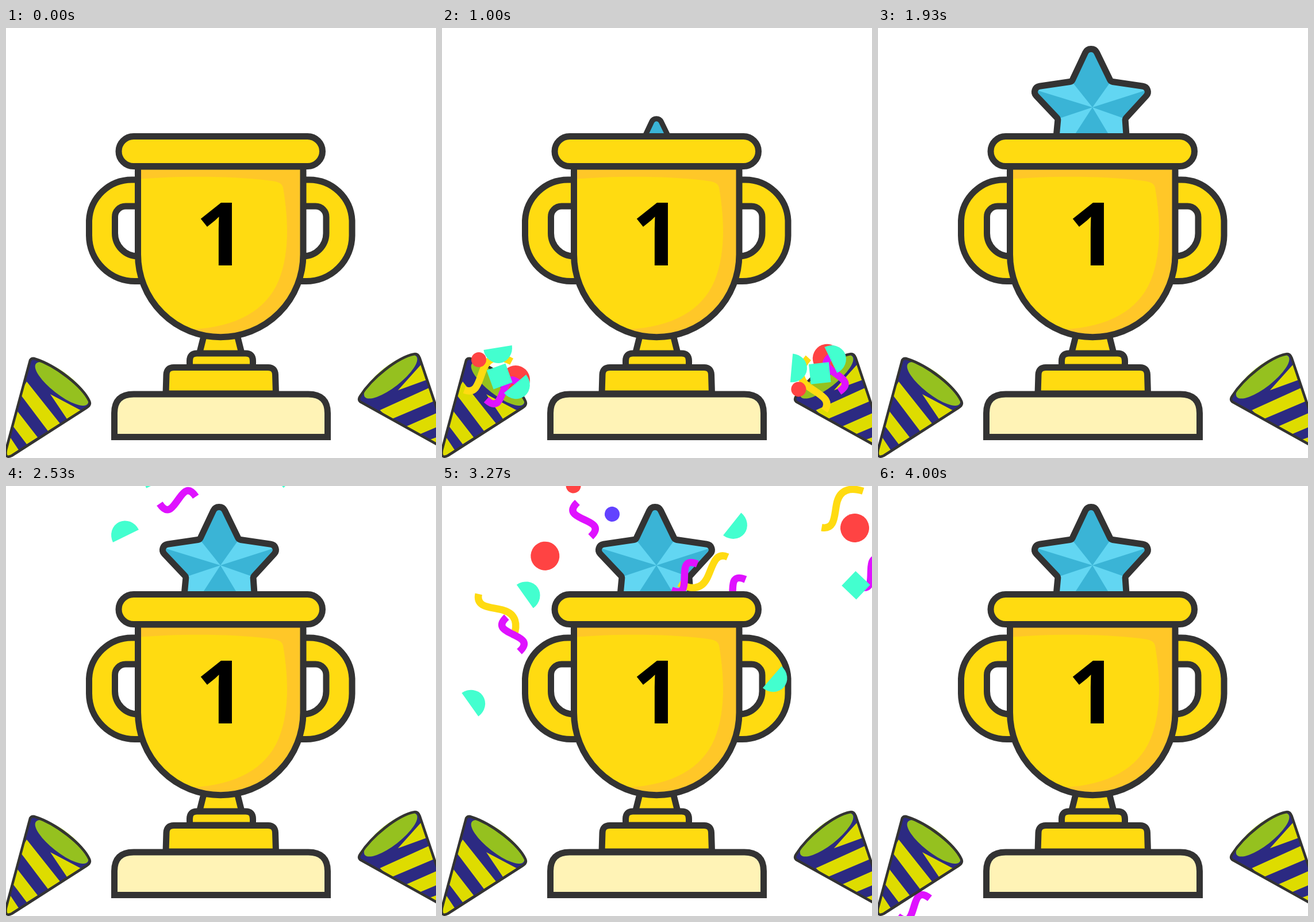
Recreate the animation shown at these times as an HTML page with a canvas. Size 748 px wide and 748 px high, loop 4070 ms.

```html
<!DOCTYPE html>
<html lang="en">
<head>
<meta charset="utf-8">
<title>First place trophy</title>
<style>
html, body { margin: 0; width: 100%; height: 100%; overflow: hidden; background: #fff; }
canvas { display: block; width: 100vw; height: 100vh; }
</style>
</head>
<body>
<canvas id="stage" width="748" height="748"></canvas>
<script>
const ctx = document.getElementById('stage').getContext('2d');
const LOOP = 4070, FPS = 15, RAD = Math.PI / 180;
const INK = '#333333', GOLD = '#ffdb11', SHADE = '#ffc728', CREAM = '#fff3b6';
const CYAN = '#43ffcf', RED = '#ff4343', PINK = '#df12ff', BLUE = '#6242ff';

const clamp = (v) => Math.min(1, Math.max(0, v));
const mix = (a, b, p) => a + (b - a) * p;
const smooth = (p) => p * p * (3 - 2 * p);

function at(x, y, deg, draw, scale = 1) {
  ctx.save();
  ctx.translate(x, y);
  ctx.rotate(deg * RAD);
  ctx.scale(scale, scale);
  draw();
  ctx.restore();
}

function paint(path, fill, stroke, width = 11) {
  if (fill) { ctx.fillStyle = fill; ctx.fill(path, 'evenodd'); }
  if (stroke) { ctx.strokeStyle = stroke; ctx.lineWidth = width; ctx.stroke(path); }
}

function poly(points) {
  return new Path2D('M' + points.map((p) => p.join(' ')).join('L') + 'Z');
}

// Polygon with rounded corners: each vertex is [x, y, radius].
function roundPoly(v) {
  const path = new Path2D(), n = v.length, last = v[n - 1];
  path.moveTo((last[0] + v[0][0]) / 2, (last[1] + v[0][1]) / 2);
  v.forEach((p, i) => {
    const q = v[(i + 1) % n];
    path.arcTo(p[0], p[1], q[0], q[1], p[2]);
  });
  path.closePath();
  return path;
}

// ---- Trophy ----
const cup = new Path2D('M229.5 241V394A143.7 143.7 0 0 0 517 394V241Z');
const cupShade = new Path2D('M229 240H517V540H373L325 524C400 520 452 492 474 440C494 392 491 330 482 278C480 268 470 267 455 265C390 257 300 257 229 263Z');
const rim = new Path2D();
rim.roundRect(196, 188.5, 354.5, 52, 26);
const handleOut = 'M232 264H219A74.5 74.5 0 0 0 144.5 335V361A80 80 0 0 0 225 440.5H236';
const handleIn = 'M232 310H208A18.5 18.5 0 0 0 189.5 329V357A40 40 0 0 0 229 397H232';
const handleFill = new Path2D(handleOut + 'Z ' + handleIn + 'Z');
const handleLine = new Path2D(handleOut + handleIn);
const stem = poly([[345, 532], [336, 568], [410.5, 568], [401.5, 532]]);
const stepTop = new Path2D('M319.5 590V579Q319.5 566 332 566H417Q429.5 566 429.5 579V590Z');
const stepMid = new Path2D('M278 636L279 603Q279.500 590.500 292 590.500H456Q468 590.500 468.500 603L469.500 636Z');
const base = new Path2D('M188.5 711.5V670Q188.500 637 222 637H526Q559.500 637 559.500 670V711.5Z');

function drawHandle() {
  paint(handleFill, GOLD);
  paint(handleLine, null, INK);
}

function drawTrophy() {
  ctx.lineJoin = 'miter';
  drawHandle();
  ctx.save();
  ctx.translate(746.5, 0);
  ctx.scale(-1, 1);
  drawHandle();
  ctx.restore();

  paint(stem, GOLD, INK);
  paint(stepTop, GOLD, INK);
  paint(stepMid, GOLD, INK);
  paint(base, CREAM, INK);

  paint(cup, GOLD);
  ctx.save();
  ctx.clip(cup);
  paint(cupShade, SHADE);
  ctx.restore();
  paint(cup, null, INK);
  paint(rim, GOLD, INK);

  ctx.fillStyle = '#000';
  ctx.font = '700 153px "Open Sans", sans-serif';
  ctx.textAlign = 'center';
  ctx.fillText('1', 373.5, 413);
}

// ---- Star ----
const tips = {
  top: [-2.5, -116, 11], ur: [32, -45, 6], right: [106.5, -34, 10], lr: [57, 20, 6],
  footR: [63, 105, 10], low: [-2.5, 70, 6], footL: [-68, 105, 10],
  ll: [-60, 20, 6], left: [-111, -34, 10], ul: [-36, -45, 6]
};
const starPath = roundPoly(Object.values(tips));
const facets = [['left', 'ul'], ['ur', 'right'], ['ll', 'footL'], ['lr', 'footR']]
  .map(([a, b]) => poly([[0, 0], tips[a].slice(0, 2), tips[b].slice(0, 2)]));

function drawStar(t) {
  if (t < 0.9) return;
  const r = Math.pow(Math.max(0, 1.733 - t) / 0.733, 1.83);
  at(373 + 2 * r, 138 + 104 * r, 0, () => {
    ctx.lineJoin = 'round';
    paint(starPath, '#3ab4d6');
    ctx.save();
    ctx.clip(starPath);
    facets.forEach((f) => paint(f, '#62d6f2'));
    ctx.restore();
    paint(starPath, null, INK);
  }, 1 - 0.17 * r);
}

// ---- Poppers, drawn around the middle of the mouth ----
const sides = [{ x: 94, y: 615, rot: 0 }, { x: 664.5, y: 608.5, rot: -76 }];
const cone = new Path2D('M-52 -37Q-49 -42 -42 -39C-8 -28 39 8 51 34Q54 40 47 45L-84 129Q-97 135 -94 119Z');
const mouth = new Path2D();
mouth.ellipse(3, 4, 57, 18.5, 38 * RAD, 0, Math.PI * 2);
const stripes = [
  [[-17, 22], [36, 50], [12, 65]],
  [[-58, 0], [0, 73], [-21, 86], [-70, 21]],
  [[-77, 48], [-39, 97], [-58, 109], [-86, 72]],
  [[-90, 92], [-72, 119], [-92, 132], [-98, 112]]
].map(poly);

function drawPoppers(t) {
  const pull = t < 0.733
    ? smooth(clamp((t - 0.2) / 0.533))
    : 1 - clamp((t - 0.733) / 0.2);
  sides.forEach((s) => at(s.x, s.y, s.rot, () => {
    ctx.translate(-13 * pull, 18 * pull);
    ctx.lineJoin = 'round';
    paint(cone, '#2c2a82');
    ctx.save();
    ctx.clip(cone);
    stripes.forEach((p) => paint(p, '#dedc00'));
    ctx.restore();
    paint(mouth, '#95c11f');
    paint(cone, null, INK, 4.5);
  }));
}

// ---- Confetti ----
const disc = (r) => {
  const p = new Path2D();
  p.arc(0, 0, r, 0, Math.PI * 2);
  return p;
};
const half = new Path2D('M-25 0A25 27 0 0 1 25 0Z');
const square = new Path2D('M-17.5 -17.500H17.500V17.500H-17.500Z');
const wave = new Path2D('M-48 0C-32 20 -16 -4 2 -16S36 -20 48 0');
const curl = new Path2D('M-32 0C-22 24 -10 9 0 0S22 -24 32 0');
const shapes = {
  half: () => paint(half, CYAN),
  square: () => paint(square, CYAN),
  big: () => paint(disc(25), RED),
  small: () => paint(disc(13), RED),
  blue: () => paint(disc(13), BLUE),
  wave: () => paint(wave, null, GOLD, 12.5),
  curl: () => paint(curl, null, PINK, 12.5)
};

// shape, local x, y, rotation, then x, y, rotation at the top for the left and right popper
const burst = [
  ['blue', 16, 0, 0, 60, -90, 0, 677, 27, 0],
  ['big', 34, -3, 0, 330, -120, 0, 454, -7, 0],
  ['curl', 12, 18, -25, 296, -5, 110, 672, -28, 98],
  ['half', 33, 4, 140, 260, -150, 200, 607, -4, 195],
  ['wave', -14, -10, -31, 222, -14, 115, 560, -140, 40],
  ['square', 6, -9, -20, 140, -180, 60, 590, 24, 15],
  ['half', 3, -59, 171, 178, -7, 200, 500, -120, 150],
  ['small', -30, -38, 0, 90, -120, 0, 690, -120, 0]
];

function drawBurst(t) {
  if (t < 0.92 || t > 1.75) return;
  const u = Math.max(0, (t - 1) / 0.3333);
  burst.forEach(([name, x, y, rot, ...ends], i) => {
    const p = Math.pow(u, 1.5 + (i % 3) * 0.5);
    sides.forEach((s, j) => {
      const c = Math.cos(s.rot * RAD), n = Math.sin(s.rot * RAD);
      const [ex, ey, er] = ends.slice(j * 3);
      at(mix(s.x + x * c - y * n, ex, p), mix(s.y + x * n + y * c, ey, p),
        mix(rot + s.rot, er, p), shapes[name]);
    });
  });
}

// shape, early x, y, late x, y, late rotation, final drop
const T1 = 2.9333, T2 = 3.5333;
const rainFront = [
  ['big', 228, 0, 153, 243, 0],
  ['big', 657, -7, 751, 161, 0],
  ['wave', 98, 85, 92, 361, 80],
  ['wave', 640, -90, 727, 169, -12],
  ['half', 190, 81.5, 119.5, 304.5, 84],
  ['half', 108.5, 227, 16.5, 527, 84],
  ['half', 534, 154, 596, 499, 160],
  ['half', 470, -70, 523.5, 199, 158],
  ['curl', 189, 132, 88, 383, 99, 80],
  ['curl', 275, -70, 232, 185, 98],
  ['curl', 646, 33, 800, 270, 164],
  ['square', 751.5, 46, 703, 298, -17],
  ['square', 270, -110, 242.5, 54, -5],
  ['small', 250, -90, 217, 95, 0],
  ['blue', 320, -80, 283, 176, 0]
];
const rainBack = [
  ['wave', 482, -16, 440, 300, 181],
  ['curl', 462, -26, 400, 330, 164],
  ['curl', 571, 22, 470, 340, 164]
];

function drawRain(list, t) {
  if (t < 2.15) return;
  const p = (t - T1) / (T2 - T1);
  const bend = (t - T1) * (t - T2);
  const exit = clamp((t - 3.7333) / 0.2667) ** 2;
  list.forEach(([name, x1, y1, x2, y2, rot, drop = 800]) => {
    const x = mix(x1, x2, p) - (x2 - x1) * 1.05 * bend;
    const y = mix(y1, y2, p) + 150 * bend + drop * exit;
    at(x, y, rot + 110 * (t - T2), shapes[name]);
  });
}

function render(t) {
  ctx.fillStyle = '#fff';
  ctx.fillRect(0, 0, 748, 748);
  drawStar(t);
  drawRain(rainBack, t);
  drawTrophy();
  drawRain(rainFront, t);
  drawPoppers(t);
  drawBurst(t);
}

const start = performance.now();
function tick() {
  const ms = (performance.now() - start) % LOOP;
  render(Math.floor((ms + 4) * FPS / 1000) / FPS);
  requestAnimationFrame(tick);
}
tick();
</script>
</body>
</html>
```
